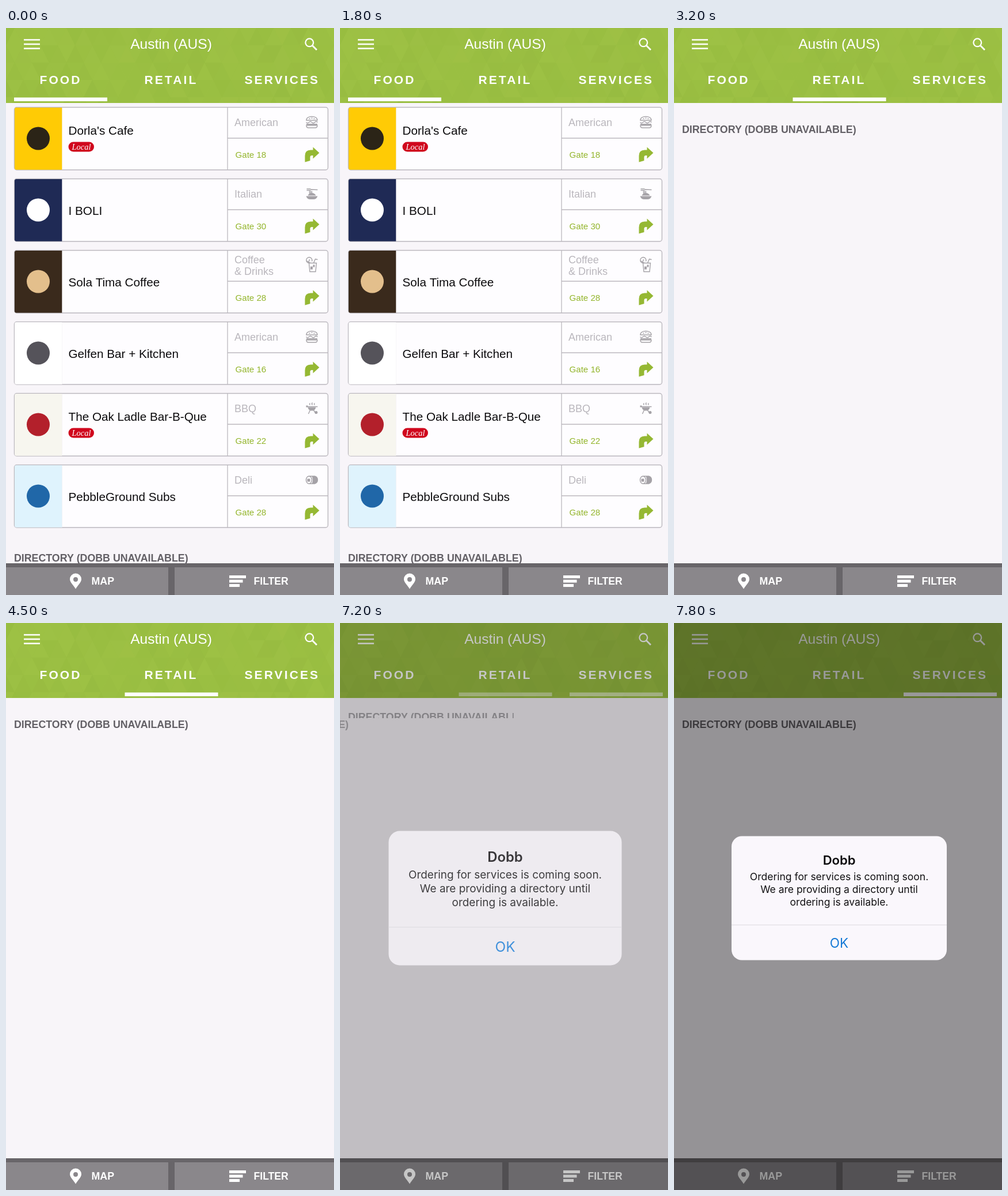
Write an HTML page with a canvas that moves like this. It is 570x983 px and loops after 8 s.

```html
<!DOCTYPE html>
<html lang="en">
<head>
<meta charset="utf-8">
<title>Airport dining directory</title>
<style>
  html, body { margin: 0; width: 100%; height: 100%; overflow: hidden; background: #f8f5f9; }
  canvas { display: block; width: 570px; height: 983px; }
</style>
</head>
<body>
<canvas id="stage" width="570" height="983"></canvas>
<script>
const ctx = document.getElementById('stage').getContext('2d');
const W = 570, H = 983, LOOP = 8000, TICK = 100;
const HEAD = 130, FOOT = 928;
const SANS = '"Liberation Sans", Arial, sans-serif';
const UI = 'Inter, sans-serif';
const HEADING = 'DIRECTORY (DOBB UNAVAILABLE)';

const CARDS = [
  { name: "Dorla's Cafe", kind: ['American'], gate: 18, icon: 'burger', local: true, tile: '#ffcb05', mark: '#2b2417' },
  { name: 'I BOLI', kind: ['Italian'], gate: 30, icon: 'pasta', tile: '#1f2a55', mark: '#ffffff' },
  { name: 'Sola Tima Coffee', kind: ['Coffee', '& Drinks'], gate: 28, icon: 'drink', tile: '#3a2a1c', mark: '#e3bf8c' },
  { name: 'Gelfen Bar + Kitchen', kind: ['American'], gate: 16, icon: 'burger', tile: '#ffffff', mark: '#55535a' },
  { name: 'The Oak Ladle Bar-B-Que', kind: ['BBQ'], gate: 22, icon: 'grill', local: true, tile: '#f7f6ef', mark: '#b3202b' },
  { name: 'PebbleGround Subs', kind: ['Deli'], gate: 28, icon: 'roll', tile: '#dff3fd', mark: '#2067a8' }
];

const TABS = [
  { label: 'FOOD', x: 58.5, bar: 14 },
  { label: 'RETAIL', x: 240.5, bar: 206.5 },
  { label: 'SERVICES', x: 414.5, bar: 399 }
];

// Icons are centred on 0,0
const ICONS = {
  burger: {
    line: 'M-9.5 -3.5C-9.5 -8 -5 -10 0 -10S9.5 -8 9.5 -3.5ZM-10 0Q-7.5 2.5 -5 0T0 0T5 0T10 0M-9.5 5.5H9.5C9.5 8.5 8 9.5 6 9.5H-6C-8 9.5 -9.5 8.5 -9.5 5.5Z',
    fill: 'M-9.5 2.5H9.5V4.5H-9.5ZM-5 -7H-3V-5.5H-5ZM-1 -8H1V-6.5H-1ZM3 -7H5V-5.5H3Z'
  },
  pasta: {
    line: 'M-9 -8.5H-2M-9 -6H-2M-2 -7.5L10 -7M-4 -5V0M-2 -5V0M0 -5V0',
    fill: 'M-7 3Q-5 -1.5 0 -1.5T7 3ZM-10 4H10Q8 9.5 3 9.5H-3Q-8 9.5 -10 4Z'
  },
  drink: {
    line: 'M-5 -4H8L6.5 11H-3.5ZM3 -4L6 -11L10 -10M-5 -4A5 5 0 1 1 0 -7M-9.5 -8L-2 -4M-4 -10.5L-6 -4',
    fill: 'M-2.5 2H1.5V7H-2.5ZM2 -1H5V3H2Z'
  },
  grill: {
    line: 'M-3 3L-6 9.5M3 3L7 9M-8 -3H10M-3 -9Q-5 -7.5 -3 -6M1 -10Q-1 -8 1 -6M5 -9Q3 -7.5 5 -6',
    fill: 'M-7 -2H7Q6 4 0 4T-7 -2ZM-10 -5H-7V-2H-10ZM5 7A2.5 2.5 0 1 0 10 7A2.5 2.5 0 1 0 5 7Z'
  },
  roll: {
    line: 'M-5 -6.5H5Q10 -5 10 0T5 6.5H-5M-5 -6.5A5 6.5 0 1 0 -5 6.5A5 6.5 0 1 0 -5 -6.5',
    fill: 'M0 -6.5H5Q10 -5 10 0T5 6.5H0Q3 0 0 -6.5ZM-8 -2H-3V3H-8Z'
  }
};
for (const icon of Object.values(ICONS)) {
  icon.line = new Path2D(icon.line);
  icon.fill = new Path2D(icon.fill);
}
const TURN = new Path2D('M0 26V15Q0 5 10 5H14V0L25 10L14 20V14.5H12Q9 14.5 9 17.5V23.5Z');
const PIN = new Path2D('M0 27C-4 20 -10 15.5 -10 10A10 10 0 0 1 10 10C10 15.5 4 20 0 27ZM0 6.5A4 4 0 1 0 0 14.5A4 4 0 1 0 0 6.5Z');

const clamp = v => Math.max(0, Math.min(1, v));
const mix = (a, b, p) => a + (b - a) * p;
const smooth = u => { u = clamp(u); return u * u * (3 - 2 * u); };

function rect(x, y, w, h, color) {
  ctx.fillStyle = color;
  ctx.fillRect(x, y, w, h);
}

function round(x, y, w, h, r, color) {
  ctx.beginPath();
  ctx.roundRect(x, y, w, h, r);
  ctx.fillStyle = color;
  ctx.fill();
}

function shape(color, ...points) {
  ctx.fillStyle = color;
  ctx.beginPath();
  for (const [x, y] of points) ctx.lineTo(x, y);
  ctx.fill();
}

function text(str, x, y, font, color, align = 'left', spacing = 0) {
  ctx.font = font;
  ctx.fillStyle = color;
  ctx.textAlign = align;
  ctx.letterSpacing = spacing + 'px';
  ctx.fillText(str, x, y);
}

function line(x1, y1, x2, y2, color, width) {
  ctx.strokeStyle = color;
  ctx.lineWidth = width;
  ctx.beginPath();
  ctx.moveTo(x1, y1);
  ctx.lineTo(x2, y2);
  ctx.stroke();
}

// Runs draw with its own offset and alpha
function layer(x, y, alpha, draw) {
  ctx.save();
  ctx.translate(x, y);
  ctx.globalAlpha *= alpha;
  draw();
  ctx.restore();
}

function drawIcon(name) {
  ctx.strokeStyle = ctx.fillStyle = '#a5a2a7';
  ctx.lineWidth = 1.4;
  ctx.stroke(ICONS[name].line);
  ctx.fill(ICONS[name].fill);
}

function drawCard(card) {
  const edge = '#bbb8be';
  round(14.5, 0.5, 545, 108.5, 4, '#fefdff');
  ctx.lineWidth = 1.4;
  ctx.strokeStyle = edge;
  ctx.stroke();
  line(385, 0, 385, 109, edge, 1.3);
  line(385, 54, 560, 54, edge, 1.3);

  rect(96.5, 1, 1, 107.5, '#eceaee');
  round(15, 1, 82.3, 107.7, [3, 0, 0, 3], card.tile);
  round(36, 34.5, 40, 40, 20, card.mark);

  text(card.name, 108.5, card.local ? 47.5 : 62.5, '20.7px ' + SANS, '#0c0b0d');
  if (card.local) {
    round(108.5, 60.5, 44.5, 17, 8.5, '#d0071d');
    text('Local', 131, 74, 'italic 14.5px "Liberation Serif", serif', '#fff', 'center');
  }
  const first = card.kind.length > 1 ? 23 : 33;
  card.kind.forEach((word, i) => text(word, 397, first + i * 20, '18px ' + SANS, '#b9b6bc'));
  text('Gate ' + card.gate, 398.5, 87.5, '15.1px ' + SANS, '#93b52b');
  layer(531.5, 26.5, 1, () => drawIcon(card.icon));
  layer(519.5, 69.5, 1, () => {
    ctx.fillStyle = '#95b833';
    ctx.fill(TURN);
  });
}

function drawHeading(y) {
  text(HEADING, 14, y + 6.5, 'bold 17.8px ' + SANS, '#636066');
}

// Leaving cells slide left while their rows close up to one spot
function leave(page, p) {
  const x = -W * p, stack = 200;
  if (page === 0) {
    CARDS.forEach((card, i) =>
      layer(x, mix(137 + 124 * i, stack, p), 1 - p, () => drawCard(card)));
    layer(x, 0, 1 - p, () => drawHeading(mix(918, stack, p)));
  } else {
    layer(x, 0, 1 - p, () => drawHeading(175));
  }
}

// The entering cell grows from its top left corner
function enter(p) {
  layer(0, 0, p, () => {
    ctx.beginPath();
    ctx.rect(0, HEAD, W * p, 66 * p);
    ctx.clip();
    drawHeading(175 - 25.5 * (1 - p));
  });
}

function drawTexture() {
  let seed = 41;
  const rand = () => (seed = seed * 16807 % 2147483647) / 2147483647;
  const tint = () => {
    const shade = rand();
    return shade < 0.5 ? `rgba(110,150,30,${0.12 * shade})` : `rgba(185,215,90,${0.2 * (shade - 0.5)})`;
  };
  const s = 30;
  for (let row = 0; row < 5; row++) {
    for (let col = -1; col < 20; col++) {
      const x = col * s + row % 2 * s / 2, y = row * s;
      const top = [x + s / 2, y], foot = [x + s, y + s];
      shape(tint(), top, foot, [x, y + s]);
      shape(tint(), top, [x + s * 1.5, y], foot);
    }
  }
}

function drawHeader(from, to, p) {
  ctx.save();
  ctx.beginPath();
  ctx.rect(0, 0, W, HEAD);
  ctx.clip();
  rect(0, 0, W, HEAD, '#9bbf43');
  drawTexture();
  ctx.restore();

  for (const y of [20.5, 28, 35.5]) line(31, y, 59, y, '#fff', 2.5);
  text('Austin (AUS)', 287, 36, '24.5px ' + SANS, '#fff', 'center');
  ctx.strokeStyle = '#fff';
  ctx.lineWidth = 2.2;
  ctx.beginPath();
  ctx.arc(527.3, 25.3, 6.9, 0, Math.PI * 2);
  ctx.stroke();
  line(532, 30, 540, 38, '#fff', 2.8);

  TABS.forEach((tab, i) => {
    text(tab.label, tab.x, 96.5, 'bold 21px ' + SANS, '#fff', 'left', 3.1);
    const alpha = i === from ? 1 - p : i === to ? p : 0;
    layer(0, 0, alpha, () => rect(tab.bar, 120.5, 162, 6.5, '#fff'));
  });
}

function drawFooter() {
  rect(0, FOOT, W, H - FOOT, '#686569');
  rect(0, 935, 282, 48, '#8a878b');
  rect(293, 935, 277, 48, '#8a878b');
  layer(121, 945.5, 1, () => {
    ctx.fillStyle = '#fff';
    ctx.fill(PIN, 'evenodd');
  });
  text('MAP', 148.5, 965, 'bold 17.8px ' + SANS, '#fff');
  [29, 23.5, 18].forEach((w, i) => rect(388, 949 + i * 7.5, w, 5, '#fff'));
  text('FILTER', 430.5, 965, 'bold 17.6px ' + SANS, '#fff');
}

function drawAlert(step) {
  const rest = 0.3 ** step;
  rect(0, 0, W, H, `rgba(0,0,0,${0.4 - 0.178 * rest})`);
  layer(287, 477, 1 - 0.2 * rest, () => {
    const scale = 1 + 0.083 * rest;
    ctx.scale(scale, scale);
    round(-187, -107.5, 374, 215, 18, '#faf7fc');
    line(-187, 46.5, 187, 46.5, '#dedbe0', 1);
    text('Dobb', 0, -58, '600 22px ' + UI, '#0b0a0c', 'center');
    ['Ordering for services is coming soon.',
     'We are providing a directory until',
     'ordering is available.'].forEach((row, i) =>
      text(row, 0, -31 + i * 22, '17.5px ' + UI, '#121113', 'center'));
    text('OK', 0, 86, '22.5px ' + UI, '#157ad6', 'center');
  });
}

function render(now) {
  const t = Math.floor(now % LOOP / TICK) * TICK;
  const last = t >= 7200;
  const from = last ? 1 : 0;
  const p = last ? clamp((t - 7100) / 189) : smooth((t - 2672) / 300);

  rect(0, 0, W, H, '#f8f5f9');
  ctx.save();
  ctx.beginPath();
  ctx.rect(0, HEAD, W, FOOT - HEAD);
  ctx.clip();
  if (p < 1) leave(from, p);
  if (p > 0) enter(p);
  ctx.restore();
  drawHeader(from, from + 1, p);
  drawFooter();
  if (last) drawAlert((t - 7200) / TICK);
}

let start;
function loop(now) {
  start ??= now;
  render(now - start);
  requestAnimationFrame(loop);
}
render(0);
requestAnimationFrame(loop);
</script>
</body>
</html>
```
